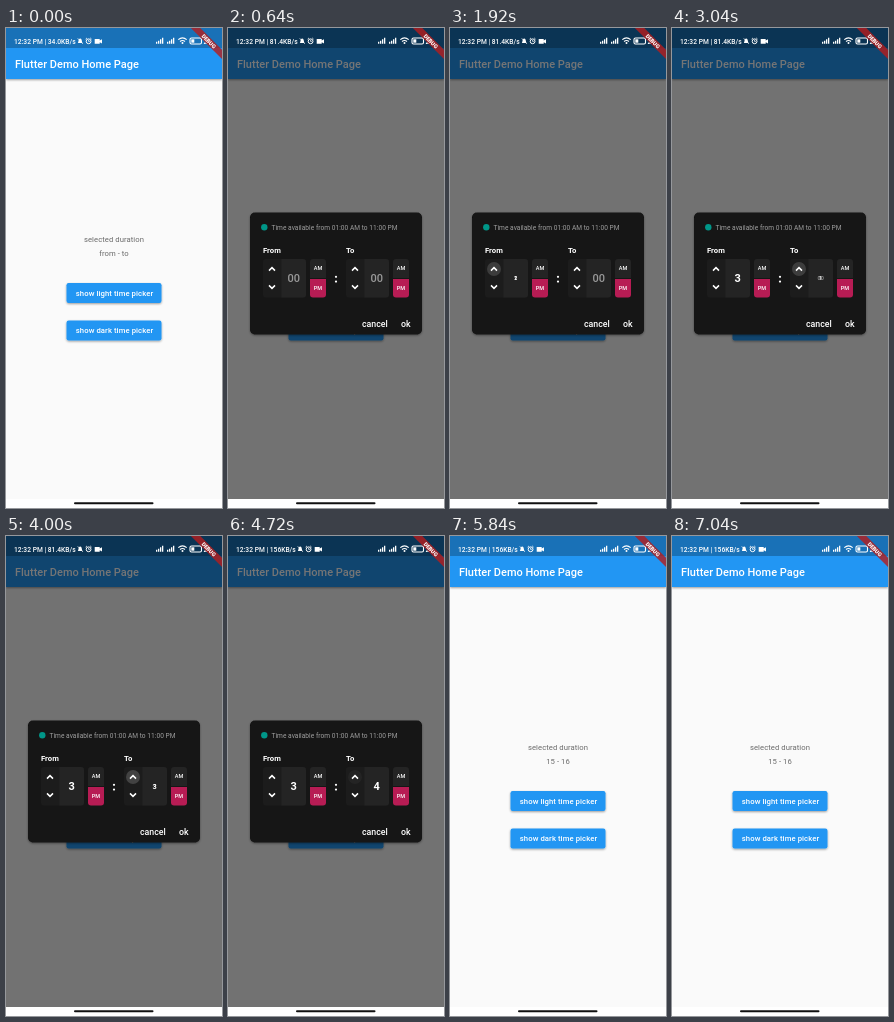
An HTML page for the animation above (7.12 s loop, 216 by 480 pixels).

```html
<!DOCTYPE html>
<html lang="en">
<head>
<meta charset="utf-8">
<title>Time picker demo</title>
<style>
  html, body { margin: 0; width: 100%; height: 100%; overflow: hidden; background: #fff; }
  svg { display: block; width: 100vw; height: 100vh; }
  text { font-family: Roboto, "Noto Sans", sans-serif; }
  .mid { text-anchor: middle; }
  .medium { font-weight: 500; }
  .bold { font-weight: 700; }
  .white { fill: #fff; }
  .line { fill: none; stroke: #fff; }
</style>
</head>
<body>
<svg viewBox="0 0 216 480">
  <defs>
    <filter id="shadow" x="-10%" y="-20%" width="120%" height="160%">
      <feDropShadow dx="0" dy="1" stdDeviation=".9" flood-opacity=".38"/>
    </filter>
    <clipPath id="stage"><rect width="216" height="480"/></clipPath>
    <g id="chevron"><path d="M-3 1.6 0-1.4 3 1.6" class="line" stroke-width="1.5"/></g>
    <g id="bars" class="white">
      <path d="M0 4h1.3v2H0zM2 3h1.3v3H2zM4 1.5h1.3V6H4zM6 0h1.3v6H6z"/>
    </g>
  </defs>

  <rect width="216" height="472" fill="#fafafa"/>
  <rect width="216" height="51" fill="#2196f3" filter="url(#shadow)"/>
  <rect width="216" height="20" fill="#1971b7"/>
  <text x="9" y="40.3" font-size="11" class="white medium">Flutter Demo Home Page</text>
  <g class="mid" font-size="7.7" fill="#6b6b6b" letter-spacing=".06">
    <text x="108" y="214">selected duration</text>
    <text x="108" y="228.3" id="range"></text>
  </g>
  <g id="buttons"></g>
  <rect id="press" x="60.5" y="292.5" width="95" height="20" rx="2.2" fill="#fff" opacity="0"/>

  <g id="dialog">
    <rect width="216" height="471" opacity=".54"/>
    <rect x="22" y="184.5" width="172" height="122" rx="5" fill="#121212" filter="url(#shadow)"/>
    <circle cx="36.3" cy="199.3" r="3.2" fill="#009688"/>
    <text x="43.5" y="201.7" font-size="6.6" letter-spacing=".03" fill="#a0a0a0">Time available from 01:00 AM to 11:00 PM</text>
    <g id="fields"></g>
    <g class="white">
      <circle cx="108" cy="248.8" r="1.1"/><circle cx="108" cy="253.6" r="1.1"/>
      <g font-size="8.8" class="medium">
        <text x="134" y="299.3">cancel</text>
        <text x="173" y="299.3">ok</text>
      </g>
    </g>
  </g>

  <text id="status" x="8" y="15.6" font-size="6.7" class="white medium"></text>
  <g id="icons">
    <path d="M71.8 15c1-1 .4-4.4 2.4-4.4s1.4 3.4 2.4 4.4zM73.4 16h1.6z" class="white"/>
    <path d="M71.8 10.4l5 5.4" class="line" stroke-width=".8"/>
    <circle cx="82.6" cy="13.3" r="2.4" class="line" stroke-width="1"/>
    <path d="M82.6 11.8v1.6h1.2M79.6 11.2l1.4-1.3M85.6 11.2l-1.4-1.3" class="line" stroke-width=".8"/>
    <path d="M88.7 11h5v1.6l2.3-1.3v4.2l-2.3-1.3v1.6h-5z" class="white"/>
  </g>
  <use href="#bars" x="150" y="9.7"/>
  <use href="#bars" x="161" y="9.7"/>
  <g class="line" stroke-width="1.1">
    <path d="M172.3 11.7q4.2-3.7 8.4 0M174 13.5q2.5-2 5 0"/>
    <rect x="184" y="10" width="11.5" height="6" rx="1.5"/>
  </g>
  <circle cx="176.5" cy="15.1" r="1" class="white"/>
  <rect x="185.3" y="11.3" width="3" height="3.4" class="white"/>
  <text x="197.5" y="15.6" font-size="6.5" class="white medium">24</text>

  <g clip-path="url(#stage)">
    <g transform="translate(216 0) rotate(45)">
      <rect x="-24" y="15.4" width="48" height="6.6" fill="#b71c1c" opacity=".8"/>
      <text y="20.7" font-size="5.5" font-weight="900" class="white mid">DEBUG</text>
    </g>
  </g>
  <rect y="471" width="216" height="9" fill="#fff"/>
  <rect x="68" y="474.2" width="79.5" height="2" rx="1" fill="#111"/>
</svg>
<script>
const LOOP = 7120, SWITCH = 300, RIPPLE = 450;
const OPEN = 400, CLOSE = 5500, FADE = 150;
const $ = id => document.getElementById(id);
const progress = (t, start, length) => Math.min(1, Math.max(0, (t - start) / length));

const button = (label, y) => `
  <rect x="60.5" y="${y}" width="95" height="20" rx="2.2" fill="#2196f3" filter="url(#shadow)"/>
  <text x="108.5" y="${y + 12.7}" font-size="7.7" letter-spacing=".08" class="white mid medium">${label}</text>`;
$('buttons').innerHTML = button('show light time picker', 255) + button('show dark time picker', 292.5);

const fields = [
  { label: 'From', x: 35, taps: [1320, 1780, 2260] },
  { label: 'To', x: 118, taps: [2890, 3340, 3800, 4300] }
];

const field = ({ label, x }) => `<g transform="translate(${x} 0)">
  <text y="224.7" font-size="7.7" class="white bold">${label}</text>
  <rect y="231" width="43" height="38.5" rx="3" fill="#1c1c1c"/>
  <path d="M18.5 231H40a3 3 0 0 1 3 3v32.5a3 3 0 0 1-3 3H18.5z" fill="#242424"/>
  <circle class="ripple" cx="9" cy="241" r="7" fill="#fff" opacity="0"/>
  <use href="#chevron" x="9" y="241"/>
  <use href="#chevron" transform="translate(9 259) scale(1 -1)"/>
  <path d="M47 250v-16a3 3 0 0 1 3-3h10a3 3 0 0 1 3 3v16z" fill="#242424"/>
  <path d="M47 251v15.5a3 3 0 0 0 3 3h10a3 3 0 0 0 3-3V251z" fill="#b71c54"/>
  <g font-size="5.5" class="white mid medium">
    <text x="55" y="242">AM</text><text x="55" y="262.2">PM</text>
  </g>
  <g class="mid bold" font-size="11"><text class="digit" y="4"/><text class="digit" y="4"/></g>
</g>`;
$('fields').innerHTML = fields.map(field).join('');

function showDigit(node, value, scale) {
  node.textContent = value || '00';
  node.setAttribute('fill', value ? '#fff' : '#999');
  node.setAttribute('font-weight', value ? 700 : 500);
  node.setAttribute('transform', `translate(30.7 250) scale(${scale})`);
  node.setAttribute('visibility', scale > 0.01 ? 'visible' : 'hidden');
}

function drawField({ taps }, node, t) {
  const value = taps.filter(tap => tap <= t).length;
  const last = value ? taps[value - 1] : -LOOP;
  const p = progress(t, last, SWITCH);
  const [before, after] = node.querySelectorAll('.digit');
  showDigit(before, Math.max(0, value - 1), 1 - p);
  showDigit(after, value, p);
  const r = progress(t, last, RIPPLE);
  node.querySelector('.ripple').setAttribute('opacity', 0.17 * Math.sin(Math.PI * r));
}

function draw(now) {
  const t = now % LOOP;
  const speed = t < OPEN ? '34.0' : t < 4400 ? '81.4' : '156';
  $('status').textContent = `12:32 PM | ${speed}KB/s`;
  $('icons').setAttribute('transform', `translate(${speed === '156' ? -2 : 0} 0)`);
  $('range').textContent = t < CLOSE ? 'from - to' : '15 - 16';
  $('press').setAttribute('opacity', 0.22 * Math.sin(Math.PI * progress(t, 200, 350)));
  $('dialog').setAttribute('opacity', progress(t, OPEN, FADE) - progress(t, CLOSE, FADE));
  fields.forEach((f, i) => drawField(f, $('fields').children[i], t));
  requestAnimationFrame(draw);
}
requestAnimationFrame(draw);
</script>
</body>
</html>
```
